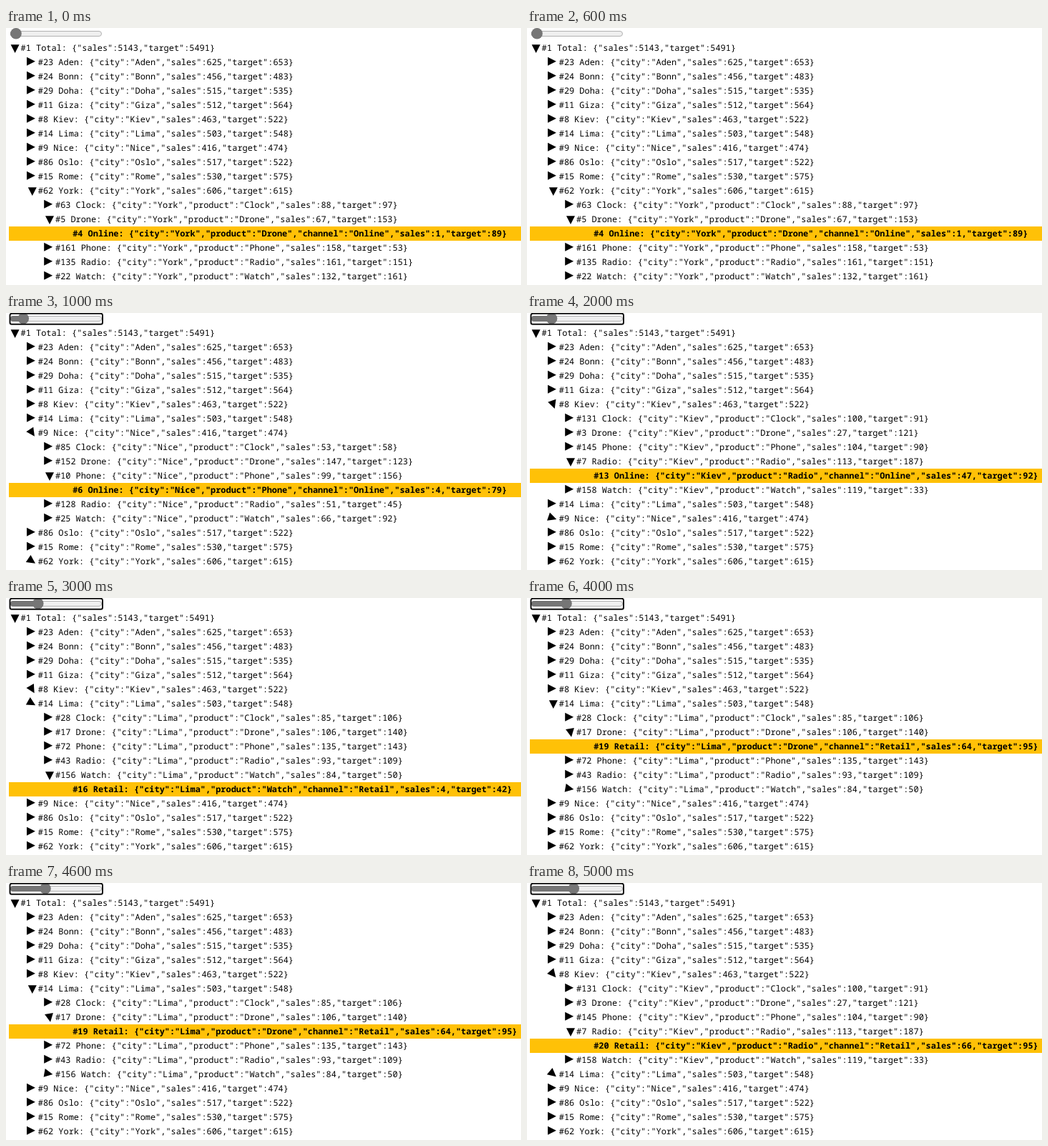
Animation of 720 by 360 pixels, one loop 6 s. Source, as an HTML page:

```html
<!DOCTYPE html>
<html lang="en">
<head>
<meta charset="utf-8">
<title>Sales tree</title>
<style>
  html, body { margin: 0; width: 100%; height: 100%; overflow: hidden; background: #fff; }
  svg { display: block; width: 720px; height: 360px; }
  text {
    font: 11.912px "Noto Sans Mono", "DejaVu Sans Mono", monospace;
    text-rendering: geometricPrecision;
  }
  .leaf { font-weight: bold; }
  .step { visibility: hidden; animation: show 6s step-end infinite; }
  @keyframes show {
    0% { visibility: visible; }
    16.666% { visibility: hidden; }
  }
</style>
</head>
<body>
<svg id="stage" viewBox="0 0 720 360"></svg>
<script>
const ROW = 20, INDENT = 24.2, OPEN = 90;

// id, name, sales, target
const cities = [
  [23, "Aden", 625, 653], [24, "Bonn", 456, 483], [29, "Doha", 515, 535],
  [11, "Giza", 512, 564], [8, "Kiev", 463, 522], [14, "Lima", 503, 548],
  [9, "Nice", 416, 474], [86, "Oslo", 517, 522], [15, "Rome", 530, 575],
  [62, "York", 606, 615]
];
const products = {
  York: [[63, "Clock", 88, 97], [5, "Drone", 67, 153], [161, "Phone", 158, 53],
         [135, "Radio", 161, 151], [22, "Watch", 132, 161]],
  Nice: [[85, "Clock", 53, 58], [152, "Drone", 147, 123], [10, "Phone", 99, 156],
         [128, "Radio", 51, 45], [25, "Watch", 66, 92]],
  Kiev: [[131, "Clock", 100, 91], [3, "Drone", 27, 121], [145, "Phone", 104, 90],
         [7, "Radio", 113, 187], [158, "Watch", 119, 33]],
  Lima: [[28, "Clock", 85, 106], [17, "Drone", 106, 140], [72, "Phone", 135, 143],
         [43, "Radio", 93, 109], [156, "Watch", 84, 50]]
};

// turns: arrows caught part way through opening or closing, in degrees
const steps = [
  { city: "York", product: "Drone", leaf: [4, "Online", 1, 89], turns: {} },
  { city: "Nice", product: "Phone", leaf: [6, "Online", 4, 79], turns: { Nice: 56, York: 34 } },
  { city: "Kiev", product: "Radio", leaf: [13, "Online", 47, 92], turns: { Kiev: 71, Nice: 19 } },
  { city: "Lima", product: "Watch", leaf: [16, "Retail", 4, 42], turns: { Lima: 30, Kiev: 60 } },
  { city: "Lima", product: "Drone", leaf: [19, "Retail", 64, 95], turns: { Drone: 80, Watch: 10 } },
  { city: "Kiev", product: "Radio", leaf: [20, "Retail", 66, 95], turns: { Kiev: 50, Lima: 40 } }
];

function label([id, name, sales, target], keys) {
  return `#${id} ${name}: ${JSON.stringify({ ...keys, sales, target })}`;
}

function arrow(level, y, angle) {
  const x = 10.5 + level * INDENT;
  return `<path d="M-5.7-8.1L6.2-2.1L-5.7 3.9Z" transform="translate(${x} ${y + 0.9}) rotate(${angle})"/>`;
}

function slider(index) {
  const x = 14 + index * 10.25;
  const ring = index
    ? '<rect x="5.5" y=".8" width="129.5" height="15" rx="2.5" fill="none" stroke="#101010" stroke-width="2"/>'
    : "";
  return `<rect x="6.5" y="4.5" width="127" height="7" rx="3.5" fill="#efefef" stroke="#b2b2b2"/>
    <rect x="6" y="4" width="${x - 6}" height="8" rx="4" fill="#767676"/>
    <circle cx="${x}" cy="7.8" r="7.8" fill="#767676"/>${ring}`;
}

function tree({ city, product, leaf, turns }) {
  let y = 28, out = "";
  const add = (level, text, angle) => {
    const isLeaf = angle === undefined;
    out += isLeaf
      ? `<rect x="4" y="${y - 10}" width="716" height="${ROW}" fill="#ffc107"/>`
      : arrow(level, y, angle);
    out += `<text x="${20.6 + level * INDENT}" y="${y + 4}"${isLeaf ? ' class="leaf"' : ""}>${text}</text>`;
    y += ROW;
  };
  const angleOf = (name, open) => turns[name] ?? (open ? OPEN : 0);

  add(0, label([1, "Total", 5143, 5491]), OPEN);
  for (const c of cities) {
    const keys = { city: c[1] }, open = c[1] === city;
    add(1, label(c, keys), angleOf(c[1], open));
    if (!open) continue;
    for (const p of products[city]) {
      const chosen = p[1] === product;
      const productKeys = { ...keys, product: p[1] };
      add(2, label(p, productKeys), angleOf(p[1], chosen));
      if (chosen) add(3, label(leaf, { ...productKeys, channel: leaf[1] }));
    }
  }
  return out;
}

document.getElementById("stage").innerHTML = steps.map((step, i) =>
  `<g class="step" style="animation-delay:${i - steps.length}s">${slider(i)}${tree(step)}</g>`
).join("");
</script>
</body>
</html>
```
